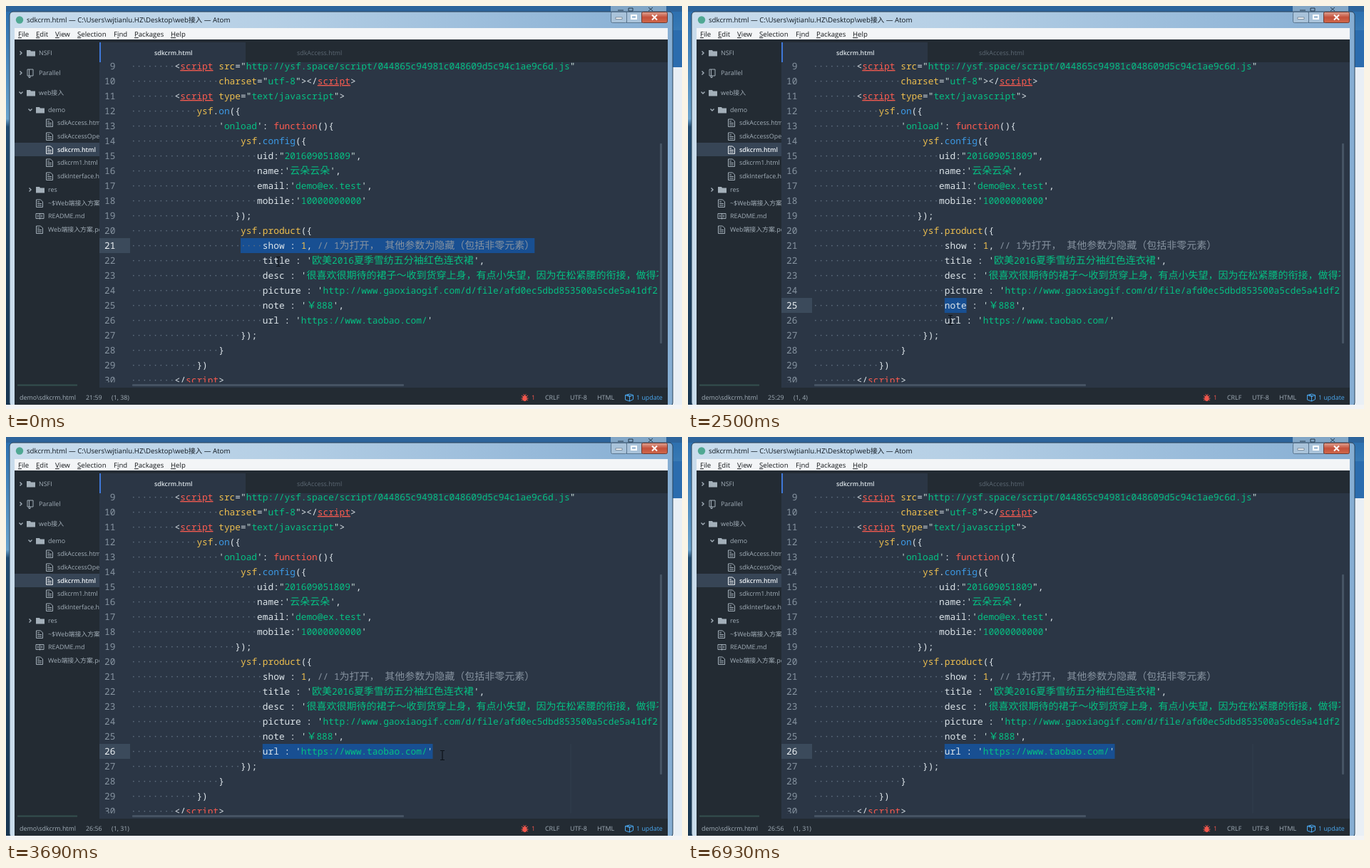
Recreate the animation shown at these times as an HTML page. Size 948 px wide and 566 px high, loop 8000 ms.

```html
<!DOCTYPE html>
<html lang="en">
<head>
<meta charset="utf-8">
<title>Editor</title>
<style>
  html, body { margin: 0; width: 100%; height: 100%; overflow: hidden; background: #1d2b3a; }
  svg { display: block; }
  text { white-space: pre; text-rendering: geometricPrecision; }
  .ui { font-family: "Open Sans", "Noto Sans CJK SC", "Noto Sans CJK", sans-serif; }
  .code { font: 12.83px "Noto Sans Mono", "Noto Sans CJK SC", "Noto Sans CJK", monospace; }
  .wide { font-size: 14px; }
</style>
</head>
<body>
<svg id="stage" width="948" height="566" viewBox="0 0 948 566"></svg>
<script>
const LOOP = 8000;
const LEFT = 175, CELL = 7.7, WIDE = 14, ROW = 21, FIRST = 9, TOP = 74, RIGHT = 915;
const BG = '#2b3645', PANEL = '#232b33', LIGHT = '#dde5ea', DIM = '#8794a1';
const INK = { w: LIGHT, r: '#ff5c50', u: '#ff5c50', y: '#efc04f', b: '#3c9ae6', g: '#05c183', c: '#8793a0', q: '#cfe3dc' };

// Lines from FIRST on: indent, then tokens led by a colour key
const LINES = [
  [8, 'w<|uscript|y src|w=|q"|ghttp://ysf.space/script/044865c94981c048609d5c94c1ae9c6d.js|q"'],
  [16, 'ycharset|w=|q"|gutf-8|q"|w></|uscript|w>'],
  [8, 'w<|uscript|y type|w=|q"|gtext/javascript|q"|w>'],
  [12, 'yysf|w.|bon|w({'],
  [16, "q'|gonload|q'|w: |rfunction|w(){"],
  [20, 'yysf|w.|bconfig|w({'],
  [23, 'wuid:|q"|g201609051809|q"|w,'],
  [23, "wname:|q'|g云朵云朵|q'|w,"],
  [23, "wemail:|q'|gdemo@ex.test|q'|w,"],
  [23, "wmobile:|q'|g10000000000|q'"],
  [19, 'w});'],
  [20, 'yysf|w.|yproduct|w({'],
  [24, 'wshow : |y1|w, |c// 1为打开， 其他参数为隐藏（包括非零元素）'],
  [24, "wtitle : |q'|g欧美2016夏季雪纺五分袖红色连衣裙|q'|w,"],
  [24, "wdesc : |q'|g很喜欢很期待的裙子～收到货穿上身，有点小失望，因为在松紧腰的衔接，做得不"],
  [24, "wpicture : |q'|ghttp://www.gaoxiaogif.com/d/file/afd0ec5dbd853500a5cde5a41df2"],
  [24, "wnote : |q'|g￥888|q'|w,"],
  [24, "wurl : |q'|ghttps://www.taobao.com/|q'"],
  [20, 'w});'],
  [16, 'w}'],
  [12, 'w})'],
  [8, 'w</|uscript|w>']
];

// time, x, y; no position means the pointer is off the picture
const POINTER = [
  [0, 382, 359], [440, 383, 372], [590, 383, 384], [730, 383, 381],
  [1180, 386, 388], [1330, 384, 396], [1480, 383, 401], [1930, 380, 408], [2070, 374, 414],
  [2210, 370, 420], [2500, 368, 441], [2650, 361, 442], [2800, 398, 444], [2950, 483, 446],
  [3100, 560, 448], [3250, 581, 467], [3400, 600, 460], [3550, 608, 451], [3690, 612, 447],
  [3980, 640, 452], [4130, 720, 468], [4280, 830, 490], [4430, 930, 508], [4570],
  [5010, 731, 284], [5160, 700, 236], [5310, 640, 207], [5450, 560, 228], [5600, 500, 290],
  [5750, 483, 350], [5890, 512, 455], [6040], [6640, 586, 512], [6790, 636, 538], [6930]
];

// time, line, from column, to column, last line if different
const SELECTION = [
  [0, 21, 20, 58], [150, 22, 27, 27], [295, 22, 24, 29], [730, 23, 27, 27], [1030, 23, 24, 28],
  [1480, 24, 27, 27], [1780, 24, 24, 31], [2210, 25, 26, 26], [2350, 25, 24, 28],
  [2650, 26, 24, 24], [2800, 26, 24, 29], [2950, 26, 24, 40], [3100, 26, 24, 50],
  [3250, 26, 24, 23, 27], [3550, 26, 24, 55]
];

const WIDE_RUN = /([\u2e80-\uffef]+)/;
const escape = s => s.replace(/&/g, '&amp;').replace(/</g, '&lt;');
const rect = (x, y, w, h, fill, more = '') => `<rect x="${x}" y="${y}" width="${w}" height="${h}" fill="${fill}" ${more}/>`;
const path = (d, stroke, fill = 'none', width = 1) => `<path d="${d}" fill="${fill}" stroke="${stroke}" stroke-width="${width}"/>`;
const label = (x, y, s, fill = '#a3afb9', size = 8.9, more = '') =>
  `<text class="ui" x="${x}" y="${y}" font-size="${size}" fill="${fill}" ${more}>${s}</text>`;
const lineTop = line => TOP + (line - FIRST) * ROW;

function columnX(line, column) {
  const [indent, tokens] = LINES[line - FIRST];
  const text = ' '.repeat(indent) + tokens.split('|').map(t => t.slice(1)).join('');
  return [...text].slice(0, column).reduce((x, ch) => x + (WIDE_RUN.test(ch) ? WIDE : CELL), LEFT);
}

function codeLine([indent, tokens], i) {
  const y = TOP + i * ROW + 15;
  const spans = tokens.split('|').map(token => {
    const runs = token.slice(1).split(WIDE_RUN)
      .map(run => WIDE_RUN.test(run) ? `<tspan class="wide">${run}</tspan>` : escape(run)).join('');
    const line = token[0] === 'u' ? ' text-decoration="underline"' : '';
    return `<tspan fill="${INK[token[0]]}"${line}>${runs}</tspan>`;
  }).join('');
  return `<text class="code" x="${LEFT}" y="${y}" fill="#617080">${'·'.repeat(indent)}</text>` +
    `<text class="code" x="${LEFT + indent * CELL}" y="${y}">${spans}</text>`;
}

const icons = {
  folder: (x, y, c) => path(`M${x} ${y - 4}h5l1 1.5h6v7h-12z`, 'none', c),
  file: (x, y, c) => path(`M${x + .5} ${y - 5}h6l3 3v7.5h-9zM${x + 2} ${y - 2}h3M${x + 2} ${y + .5}h6M${x + 2} ${y + 3}h6`, c),
  repo: (x, y, c) => path(`M${x + 1} ${y - 5}h8v9h-8zM${x + 3.5} ${y - 5}v9M${x + 3} ${y + 4}v2.5h2v-2.5`, c),
  book: (x, y, c) => path(`M${x} ${y - 3.5}h11v7h-11zM${x + 5.5} ${y - 3.5}v8M${x + 2} ${y - 1}h2M${x + 2} ${y + 1}h2M${x + 7} ${y - 1}h2M${x + 7} ${y + 1}h2`, c)
};
const chevron = (x, y, open) => path(open ? `M${x - 2.5} ${y - 1.5}l2.5 2.5l2.5 -2.5` : `M${x - 1.5} ${y - 2.5}l2.5 2.5l-2.5 2.5`, '#a3afb9', 'none', 1.4);

// icon, icon x, centre y, name, chevron (1 closed, 2 open)
const TREE = [
  ['folder', 29, 66, 'NSFI', 1], ['repo', 29, 94, 'Parallel', 1], ['folder', 29, 122, 'web接入', 2],
  ['folder', 42, 146, 'demo', 2], ['file', 56, 164, 'sdkAccess.html'], ['file', 56, 183, 'sdkAccessOpen.html'],
  ['file', 56, 202, 'sdkcrm.html'], ['file', 56, 220, 'sdkcrm1.html'], ['file', 56, 239, 'sdkInterface.html'],
  ['folder', 42, 258, 'res', 1], ['file', 42, 277, '~$Web端接入方案'], ['book', 42, 295, 'README.md'],
  ['file', 42, 314, 'Web端接入方案.pdf']
];
const treeRow = ([icon, x, y, name, arrow]) => {
  const active = name === 'sdkcrm.html';
  const color = active ? '#f0f4f7' : '#a3afb9';
  return (active ? rect(12, 192, 119, 19, '#374556') : '') + (arrow ? chevron(x - 8, y, arrow === 2) : '') +
    icons[icon](x, y, color) + label(x + (icon === 'file' && x > 50 ? 16 : 17), y + 3.2, name, color, 8.9, active ? 'font-weight="600"' : '');
};

const MENU = [[17, '_File'], [42, '_Edit'], [69, '_View'], [100, '_Selection'], [151, 'F_ind'], [180, '_Packages'], [231, '_Help']];
const menuItem = ([x, s]) => label(x, 43.2, s.replace(/_(.)/, '<tspan text-decoration="underline">$1</tspan>'), '#15181b', 9.6);

const frame = `
  <defs>
    <linearGradient id="glass"><stop offset="0" stop-color="#c9dcec"/><stop offset=".4" stop-color="#b5cfe5"/><stop offset="1" stop-color="#86aed3"/></linearGradient>
    <linearGradient id="desk" x2="0" y2="1"><stop offset="0" stop-color="#2a6eae"/><stop offset=".28" stop-color="#6aa3cd"/><stop offset=".3" stop-color="#1f4a70"/><stop offset="1" stop-color="#17344f"/></linearGradient>
    <linearGradient id="close" x2="0" y2="1"><stop offset="0" stop-color="#e0a494"/><stop offset=".5" stop-color="#c4503a"/><stop offset="1" stop-color="#d0694c"/></linearGradient>
    <clipPath id="view"><rect x="131" y="79" width="784" height="449.5"/></clipPath>
  </defs>` +
  rect(0, 0, 948, 566, 'url(#desk)') + rect(0, 0, 948, 8, '#2d649b') +
  rect(848, 0, 78, 8, '#82a6c6') + path('M858 6h8M873 3h6v4h-6zM901 2l6 5M907 2l-6 5', '#263a4d') +
  rect(935, 34, 13, 52, '#2b6cae') + rect(935, 86, 13, 480, '#e9eff5') +
  rect(5, 8, 930, 554, 'url(#glass)', 'rx="5" stroke="#2a4258"') +
  rect(0, 560, 948, 6, '#f3f4f5') +
  '<circle cx="19" cy="19.5" r="5.2" fill="#4fa893"/>' +
  label(29, 22.8, 'sdkcrm.html — C:\\Users\\wjtianlu.HZ\\Desktop\\web接入 — Atom', '#101820', 9.7) +
  rect(848.5, 8.5, 22, 15, '#a9c3da', 'rx="2" stroke="#5a7690"') + rect(870.5, 8.5, 21, 15, '#a9c3da', 'stroke="#5a7690"') +
  rect(891.5, 8.5, 36, 15, 'url(#close)', 'rx="2" stroke="#6d3a31"') +
  rect(855, 16, 9, 2.5, '#fff', 'stroke="#4a5b6b" stroke-width=".6"') + rect(877, 13, 7, 5, 'none', 'stroke="#fff" stroke-width="2"') +
  path('M906 12.5l7 7M913 12.5l-7 7', '#fff', 'none', 2) +
  rect(12, 31, 916, 16, '#f3f5f7') + MENU.map(menuItem).join('') +
  rect(12, 47, 916, 513, PANEL) + TREE.map(treeRow).join('') + rect(16, 531.5, 84, 2, '#35504f') +
  rect(131, 47, 797, 32, PANEL) + rect(131, 79, 797, 457, BG) +
  rect(131, 51, 205, 28, BG) + rect(131, 51, 2, 28, '#3f78d8') +
  label(208, 69, 'sdkcrm.html', '#dce4e9', 8.8, 'font-weight="600"') + label(408, 69, 'sdkAccess.html', '#5d6974') +
  rect(177, 531, 381, 3, '#465363', 'rx="1"') + rect(917, 193, 3, 281, '#465464', 'rx="1"') +
  rect(12, 536, 916, 24, PANEL) +
  label(19, 553, 'demo\\sdkcrm.html') + label(756, 553, 'CRLF') + label(791, 553, 'UTF-8') + label(829, 553, 'HTML') +
  '<ellipse cx="727.5" cy="551" rx="3" ry="4" fill="#f0564c"/>' + path('M723 547l9 7M732 547l-9 7M722.5 551h10M725.5 545l2 2l2 -2', '#f0564c') +
  label(737, 553, '1', '#f0564c') +
  path('M868.5 546.5l6 -1.5l5 1.5v6l-5 2.5l-6 -2zM868.5 546.5l6 2l5 -2M874.5 548.5v6.5M871 546l5 2', '#4aa8f0') +
  label(884, 553, '1 update', '#4aa8f0');

const numbers = LINES.map((_, i) => {
  const n = FIRST + i;
  return `<text class="code" data-line="${n}" x="153.5" y="${lineTop(n) + 15}" text-anchor="end">${n}</text>`;
}).join('');

const stage = document.getElementById('stage');
stage.innerHTML = frame +
  '<g clip-path="url(#view)"><g id="marks"></g>' + numbers + LINES.map(codeLine).join('') + '</g>' +
  '<g id="caret">' + rect(0, 0, 1, 20, '#e8eef2') + '</g>' +
  label(112, 553, '', undefined, 8.9, 'id="position"') + label(148, 553, '', undefined, 8.9, 'id="size"') +
  '<g id="pointer">' + path('M-3 -6.5h2.5l.5 .5l.5 -.5h2.5M0 -6v12M-3 6.5h2.5l.5 -.5l.5 .5h2.5', '#0c1219', 'none', 1.2) + '</g>';

const $ = id => document.getElementById(id);
const lineNumbers = stage.querySelectorAll('[data-line]');
const stepAt = (table, t) => table.filter(step => step[0] <= t).pop();

function showSelection([time, line, from, to, last = line]) {
  const empty = last === line && from === to;
  const start = columnX(line, from), end = columnX(last, to);
  const mark = (n, a, b) => rect(a, lineTop(n), b - a, ROW, '#184f92');
  let marks = '';
  for (let n = line; n <= last; n++) marks += rect(131, lineTop(n), 43, ROW, '#3b4a5b');
  if (last > line) marks += mark(line, start, RIGHT) + mark(last, 174, end);
  else if (!empty) marks += mark(line, start, end);
  if (time >= 3250) marks += rect(791.5, 431, 1, 98, '#333f4e');
  $('marks').innerHTML = marks;
  lineNumbers.forEach(el => {
    const on = el.dataset.line >= line && el.dataset.line <= last;
    el.setAttribute('fill', on ? '#eef3f6' : DIM);
  });
  $('caret').setAttribute('visibility', empty ? 'visible' : 'hidden');
  $('caret').setAttribute('transform', `translate(${start - .5} ${lineTop(line)})`);
  $('position').textContent = `${last}:${to + 1}`;
  // A line break counts as two characters
  const count = last > line ? 31 + 2 + to : to - from;
  $('size').textContent = empty ? '' : `(${last - line + 1}, ${count})`;
}

function showPointer([, x, y]) {
  $('pointer').setAttribute('visibility', x === undefined ? 'hidden' : 'visible');
  if (x !== undefined) $('pointer').setAttribute('transform', `translate(${x} ${y})`);
}

const begin = performance.now();
let selection, pointer;
function draw() {
  const t = (performance.now() - begin) % LOOP;
  const nextSelection = stepAt(SELECTION, t), nextPointer = stepAt(POINTER, t);
  if (nextSelection !== selection) showSelection(selection = nextSelection);
  if (nextPointer !== pointer) showPointer(pointer = nextPointer);
  requestAnimationFrame(draw);
}
draw();
</script>
</body>
</html>
```
